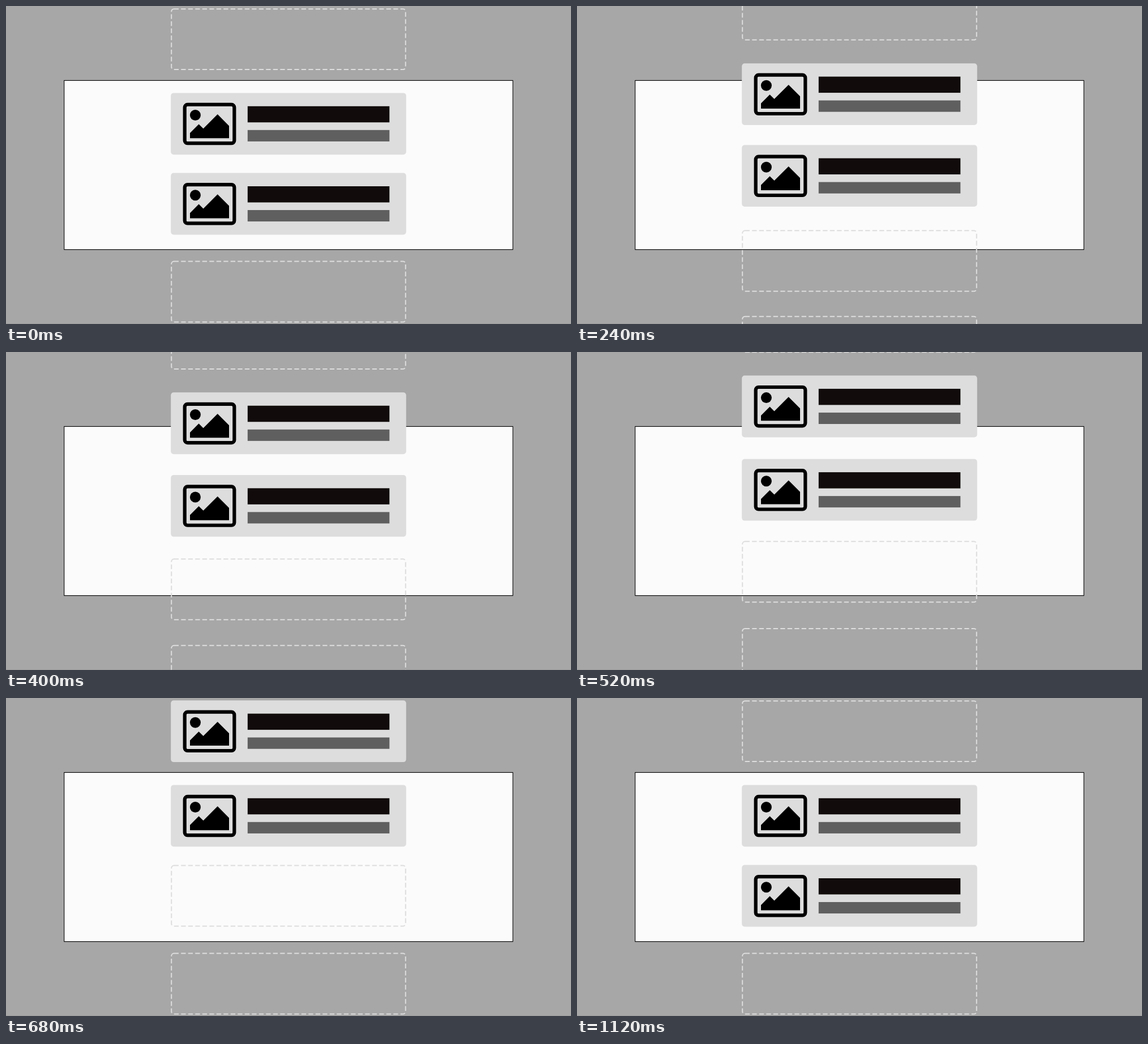
These frames come from a looping animation (998 px wide and 561 px high, 1840 ms). An HTML page with a canvas:

```html
<!DOCTYPE html>
<html lang="en">
<head>
<meta charset="utf-8">
<title>Recycled list cards</title>
<style>
  html, body { margin: 0; width: 100%; height: 100%; overflow: hidden; background: #a7a7a7; }
  canvas { display: block; }
</style>
</head>
<body>
<canvas id="stage" width="998" height="561"></canvas>
<script>
const ctx = document.getElementById('stage').getContext('2d');
const LOOP = 1840, TICK = 40;
const SLIDE = 20, FADE_START = 27, FADE = 6, GAMMA = 2.4;
const BACK = [167, 167, 167], PANEL = [251, 251, 251], CARD = [221, 221, 221];
const INK = [0, 0, 0], TITLE = [17, 12, 11], LINE = [95, 95, 95];
const X = 291.2, W = 415.6, H = 108.9;
const ROWS = { above: -145.1, top: 4.2, first: 153.4, second: 294.6, below: 449.6, last: 598.9 };

const clamp = v => Math.min(1, Math.max(0, v));
const lerp = (a, b, k) => a + (b - a) * k;
const css = c => `rgb(${c.map(Math.round).join()})`;

// Blend in linear light, as the fade does
const mix = (a, b, k) => css(a.map((v, i) =>
  255 * lerp((v / 255) ** GAMMA, (b[i] / 255) ** GAMMA, k) ** (1 / GAMMA)));

function rounded(x, y, w, h, r) {
  ctx.beginPath();
  ctx.roundRect(x, y, w, h, r);
}

function slot(y) {
  ctx.save();
  ctx.strokeStyle = css(CARD);
  ctx.lineWidth = 2;
  ctx.setLineDash([8.3, 4.2]);
  rounded(X + 1, y + 1, W - 2, H - 2, 4.5);
  ctx.stroke();
  ctx.restore();
}

function card(y, alpha = 1, under = PANEL) {
  if (alpha > 0) {
    const tint = c => mix(under, c, alpha);
    ctx.save();
    ctx.translate(0, y);
    ctx.fillStyle = tint(CARD);
    rounded(X, 0, W, H, 5);
    ctx.fill();

    ctx.fillStyle = ctx.strokeStyle = tint(INK);
    ctx.lineWidth = 6.2;
    rounded(315.7, 20.5, 87.6, 68.3, 5);
    ctx.stroke();
    ctx.beginPath();
    ctx.arc(334.4, 39.1, 9.5, 0, 7);
    ctx.fill();
    ctx.beginPath();
    for (const [px, py] of [[325, 70.6], [340.5, 55], [348.5, 62.9], [373.7, 37.7],
      [394, 58], [394, 79.8], [325, 79.8]]) ctx.lineTo(px, py);
    ctx.fill();

    ctx.fillStyle = tint(TITLE);
    ctx.fillRect(426.8, 23.4, 250.5, 28.5);
    ctx.fillStyle = tint(LINE);
    ctx.fillRect(426.8, 65.4, 250.5, 20.1);
    ctx.restore();
  }
  if (alpha < 1) slot(y);
}

function backdrop() {
  ctx.fillStyle = css(BACK);
  ctx.fillRect(0, 0, 998, 561);
  ctx.fillStyle = '#9c9c9c';
  ctx.fillRect(0, 560, 998, 1);
  ctx.fillStyle = css(PANEL);
  ctx.fillRect(102.5, 131.5, 793, 298);
  ctx.strokeStyle = '#000';
  ctx.lineWidth = 1.1;
  ctx.strokeRect(102.7, 131.4, 792.6, 298.3);
}

function draw(ms) {
  // The motion runs at 6 beats per 5 ticks
  const n = Math.floor(ms / TICK);
  const beat = Math.max(0, n + Math.floor((n - 1) / 5));
  const k = clamp(beat / SLIDE);
  const fade = clamp((beat - FADE_START) / FADE);
  const between = (a, b) => lerp(ROWS[a], ROWS[b], k);

  backdrop();
  slot(between('top', 'above'));
  slot(between('last', 'below'));
  card(between('below', 'second'), fade, PANEL);
  card(between('first', 'top'), 1 - fade, BACK);
  card(between('second', 'first'));
}

const start = performance.now();
function tick() {
  draw((performance.now() - start) % LOOP);
  requestAnimationFrame(tick);
}
tick();
</script>
</body>
</html>
```
